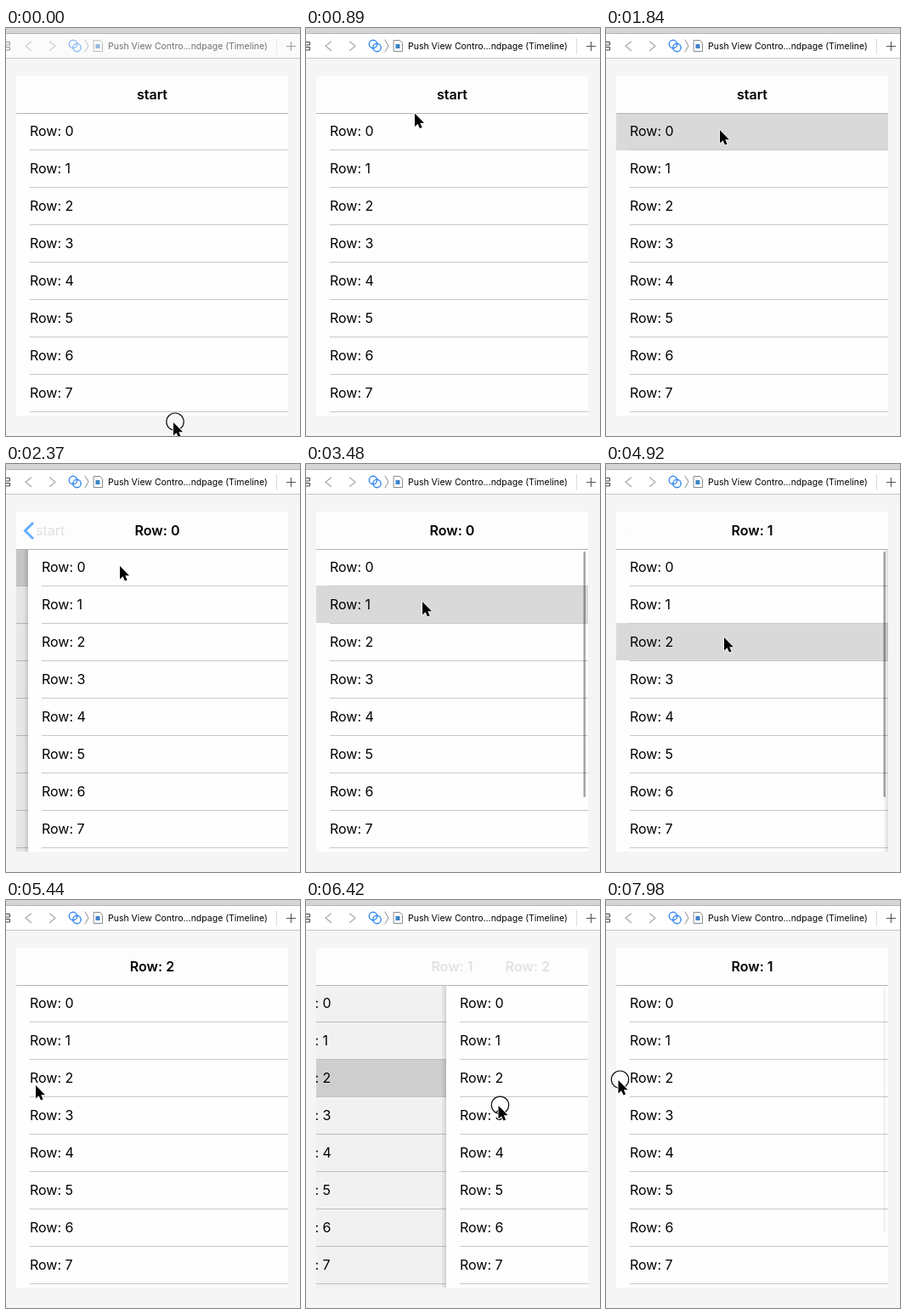
An HTML page for the animation above (8000 ms loop, 346 by 480 pixels).

```html
<!DOCTYPE html>
<html lang="en">
<head>
<meta charset="utf-8">
<title>Push View Controller</title>
<style>
html, body { margin: 0; width: 100%; height: 100%; overflow: hidden; background: #f5f5f5; }
svg { display: block; width: 346px; height: 480px; }
text { font-family: Inter, Roboto, "Liberation Sans", sans-serif; font-size: 16px; white-space: pre; }
.title { font-weight: 600; text-anchor: middle; }
.line { fill: none; stroke-linecap: round; stroke-linejoin: round; }
</style>
</head>
<body>
<svg id="stage" viewBox="0 0 346 480" width="346" height="480">
  <defs>
    <clipPath id="phone"><rect x="12" y="56" width="320" height="400"/></clipPath>
    <linearGradient id="edge">
      <stop offset="0" stop-color="#000" stop-opacity="0"/>
      <stop offset="1" stop-color="#000" stop-opacity=".13"/>
    </linearGradient>
  </defs>
  <rect width="346" height="480" fill="#f5f5f5"/>

  <rect width="346" height="6" fill="#d5d5d5"/>
  <rect y="6" width="346" height="1" fill="#b4b4b4"/>
  <rect id="bar" y="7" width="346" height="28" fill="#fff"/>
  <rect y="35" width="346" height="1" fill="#c6c6c6"/>
  <g id="tools">
    <path class="line" stroke="#444" d="M-2 16.5H4.5V20H-2M-2 22.5H4.5V26H-2"/>
    <path class="line" stroke="#a9a9a9" stroke-width="1.2" d="M29.5 16L23 21.2L29.5 26.5M51.5 16L58 21.2L51.5 26.5"/>
    <g class="line" stroke="#2f86f0" stroke-width="1.4">
      <circle cx="79" cy="19" r="4.7"/><circle cx="83.5" cy="23" r="4.7"/>
    </g>
    <path class="line" stroke="#8c8c8c" d="M93 14L97 21L93 28"/>
    <path class="line" stroke="#8a8a8a" d="M103.500 14.500H110.500L113.500 17.500V27.500H103.500Z"/>
    <rect x="105.500" y="19" width="5" height="5" fill="#3c84c8"/>
    <text id="file" x="120" y="25" style="font-size:10.5px">Push View Contro...ndpage (Timeline)</text>
    <path stroke="#dcdcdc" d="M318.500 12V31"/>
    <path stroke="#555" stroke-width="1.1" d="M330 21.500H341M335.500 16V27"/>
  </g>

  <g clip-path="url(#phone)">
    <g id="under"></g>
    <rect id="dim" x="12" y="100" width="320" height="356"/>
    <g id="over"></g>
    <rect x="12" y="56" width="320" height="44" fill="#fdfdfd"/>
    <rect x="12" y="100" width="320" height="1" fill="#b5b5b5"/>
    <text id="oldTitle" class="title" y="84"></text>
    <text id="newTitle" class="title" y="84"></text>
    <path id="chevron" class="line" stroke="#007aff" stroke-width="3" style="stroke-linecap:butt;stroke-linejoin:miter" d="M32 69L22.500 78.500L32 88"/>
    <text id="back" x="35" y="84"></text>
  </g>

  <circle id="press" r="10.200" fill="none" stroke="#111" stroke-width="1.200"/>
  <g id="cursor">
    <path d="M0 0V15.500L3.600 12.200L6 17.600L8.600 16.400L6.300 11.200H11Z" stroke="#fff" stroke-width="1.600" stroke-linejoin="round" paint-order="stroke"/>
  </g>
</svg>
<script>
const LOOP = 8000, WIDTH = 320, CENTER = 172;
const NS = "http://www.w3.org/2000/svg";
const titles = ["start", "Row: 0", "Row: 1", "Row: 2"];
const pushes = [2140, 3670, 4920];
const POP = 6000, RELEASE = 6470, POPPED = 6640;
const presses = [[0, 200], [1660, 1840], [3190, 3370], [4440, 4620], [5950, RELEASE], [7800, LOOP]];

// time, x, y of the pointer tip
const path = [
  [650, 197, 464], [890, 128, 100.5], [1000, 117, 85], [1150, 122, 104], [1300, 134, 120],
  [2560, 134, 120], [2840, 137, 162], [3700, 137, 162], [3920, 139, 204],
  [5150, 139, 204], [5440, 35, 218], [5780, 15, 221], [POP, 15, 221],
  [6420, 226, 242], [6500, 262, 246], [6760, 262, 246], [7200, 60, 232],
  [7420, 0, 214], [7580, 0, 214], [7720, 14.5, 212]
];

const $ = id => document.getElementById(id);
const clamp = v => Math.max(0, Math.min(1, v));
const ramp = (t, a, b) => clamp((t - a) / (b - a));

function add(parent, tag, attrs, text) {
  const el = document.createElementNS(NS, tag);
  for (const k in attrs) el.setAttribute(k, attrs[k]);
  if (text) el.textContent = text;
  parent.appendChild(el);
  return el;
}
const set = (el, k, v) => el.setAttribute(k, v);
const move = (el, x, y) => set(el, "transform", `translate(${x} ${y})`);

function makePage(g) {
  const shadow = add(g, "rect", { x: 6, y: 100, width: 6, height: 356, fill: "url(#edge)" });
  add(g, "rect", { x: 12, y: 100, width: WIDTH, height: 356, fill: "#fefefe" });
  const mark = add(g, "rect", { x: 12, y: 100, width: WIDTH, height: 44, fill: "#d9d9d9" });
  for (let i = 0; i < 8; i++) {
    add(g, "text", { x: 28, y: 127 + 44 * i }, "Row: " + i);
    add(g, "rect", { x: 28, y: 143 + 44 * i, width: 304, height: 1, fill: "#c8c7cc" });
  }
  const thumb = add(g, "rect", { x: 326.5, y: 103, width: 2.5, height: 289, rx: 1.25, fill: "#000" });
  return { g, shadow, mark, thumb };
}
const under = makePage($("under")), over = makePage($("over"));

function drawPage(page, x, row, rowAlpha, thumbAlpha) {
  move(page.g, x, 0);
  set(page.mark, "y", 99 + 44 * row + (row ? 0 : 1));
  set(page.mark, "opacity", rowAlpha);
  set(page.thumb, "opacity", thumbAlpha * 0.35);
}

function pointer(t) {
  if (t <= path[0][0]) return path[0].slice(1);
  for (let i = 1; i < path.length; i++) {
    const [t1, x1, y1] = path[i], [t0, x0, y0] = path[i - 1];
    if (t < t1) {
      const k = (t - t0) / (t1 - t0);
      return [x0 + (x1 - x0) * k, y0 + (y1 - y0) * k];
    }
  }
  return path[path.length - 1].slice(1);
}

// critically damped slide: the part of the width still to go
function slide(ms) {
  const k = 21.3 * ms / 1000;
  return (1 + k) * Math.exp(-k);
}

const dragged = t => (pointer(t)[0] - 15) * 0.725;

function popOffset(t) {
  if (t < RELEASE) return dragged(t);
  const from = dragged(RELEASE), k = ramp(t, RELEASE, POPPED);
  return from + (WIDTH - from) * (1 - (1 - k) ** 2);
}

const flash = (t, at) => t < at ? 0 : 1 - ramp(t, at + 1000, at + 1260);

function draw(t) {
  const active = t >= 110;
  set($("bar"), "fill", active ? "#fff" : "#fbfbfb");
  set($("tools"), "opacity", active ? 1 : 0.55);

  const depth = pushes.filter(p => t >= p).length;
  const popping = t >= POP && t < POPPED, popped = t >= POPPED;
  const top = popped ? 2 : depth;
  const age = depth ? t - pushes[depth - 1] : 1e4;

  let offset = 0;
  if (popping) offset = popOffset(t);
  else if (depth && !popped) offset = WIDTH * slide(age);
  offset = Math.round(offset);
  const p = 1 - offset / WIDTH;

  const row = Math.max(0, top - 1);
  drawPage(under, -Math.round(offset ? 0.3 * WIDTH * p : 0), row,
    popping ? 1 - ramp(t, RELEASE, POPPED) : 1,
    depth > 1 && !popping ? flash(t, pushes[depth - 2] + 820) : 0);

  const tapAt = [1720, 3250, 4500][top];
  const selected = !popped && tapAt && t >= tapAt ? 1 : 0;
  const flashAt = popped ? 6760 : depth ? pushes[depth - 1] + 820 : LOOP;
  drawPage(over, offset, Math.min(top, 2), selected, flash(t, flashAt));
  set(over.shadow, "opacity", offset ? 1 : 0);
  set(under.shadow, "opacity", 0);
  set($("dim"), "opacity", 0.1 * p);

  const oldT = $("oldTitle"), newT = $("newTitle");
  oldT.textContent = offset ? titles[top - 1] : "";
  newT.textContent = titles[top];
  set(oldT, "x", CENTER);
  set(oldT, "opacity", clamp((0.57 - p) / 0.45));
  set(newT, "x", CENTER + offset * (popping ? 0.58 : 0.43));
  set(newT, "opacity", offset ? clamp((p - 0.475) / 0.45) : 1);

  const glow = popped || popping ? 0 : 0.6 * ramp(age, 0, 150) * (1 - ramp(age, 170, 370) * 0.999);
  const hint = age < 370 ? glow * 1.6 : 0;
  set($("chevron"), "opacity", Math.min(0.6, hint));
  $("back").textContent = depth ? titles[depth - 1] : "";
  set($("back"), "opacity", hint * 0.16);

  const [x, y] = pointer(t);
  move($("cursor"), Math.round(x * 2) / 2, Math.round(y * 2) / 2);
  move($("press"), x + 2, y - 0.8);
  set($("press"), "opacity", presses.some(([a, b]) => t >= a && t < b) ? 1 : 0);
}

const began = performance.now();
function tick() {
  draw((performance.now() - began) % LOOP);
  requestAnimationFrame(tick);
}
draw(0);
requestAnimationFrame(tick);
</script>
</body>
</html>
```
